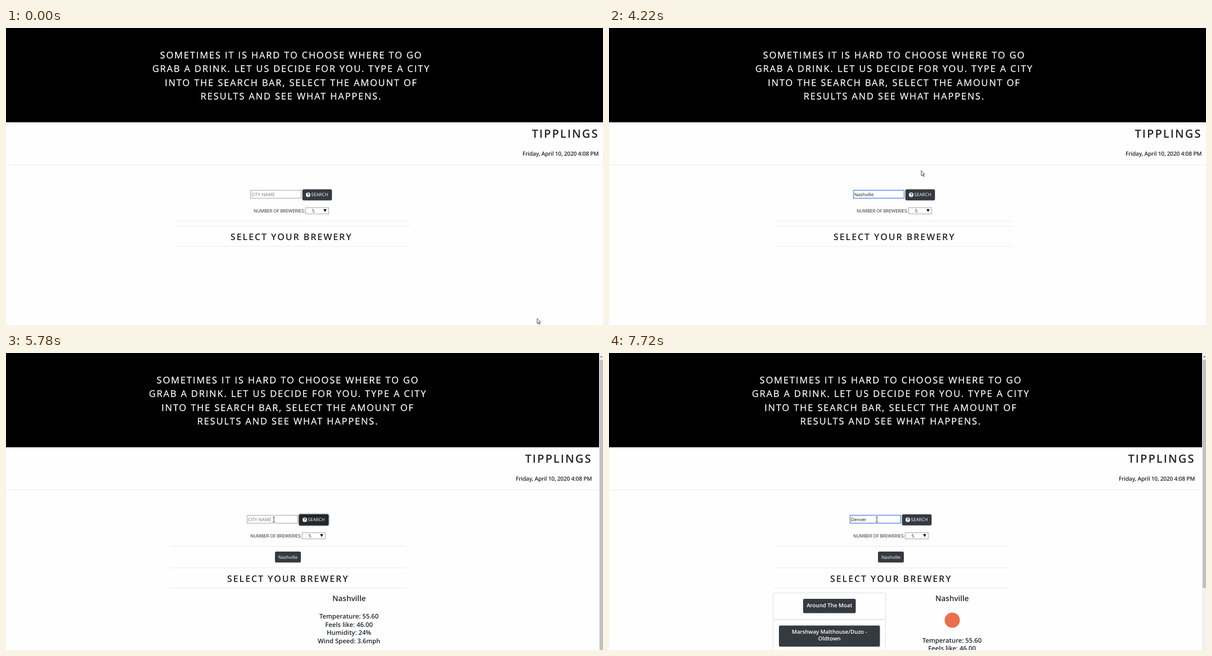
An HTML page for the animation above (8 s loop, 1061x528 px).

```html
<!DOCTYPE html>
<html lang="en">
<head>
<meta charset="utf-8">
<title>Brewery search</title>
<style>
  html, body { margin: 0; width: 100%; height: 100%; overflow: hidden; background: #fefefe; }
  svg { display: block; width: 1061px; height: 528px; }
  text { font-family: "Open Sans", "Noto Sans", sans-serif; font-size: 8.1px; fill: #212529; text-rendering: geometricPrecision; white-space: pre; }
  .mid { text-anchor: middle; }
  .end { text-anchor: end; }
  .intro text { font-size: 16.4px; letter-spacing: 1.88px; fill: #fff; stroke: #fff; stroke-width: .25; }
  .title { font-size: 20px; font-weight: 600; letter-spacing: 2.1px; }
  .date { font-size: 10.1px; font-weight: 600; letter-spacing: -.2px; }
  .head { font-size: 16px; font-weight: 600; letter-spacing: 1.92px; }
  .label { letter-spacing: -.13px; }
  .city { font-size: 13.4px; font-weight: 600; }
  .facts text { font-size: 11.3px; font-weight: 600; }
  .bar text { font-size: 9.7px; font-weight: 600; fill: #fff; }
  .light { fill: #fff; }
  .btn { fill: #343a40; }
  .rule { stroke: #ebebeb; }
  .card { fill: #fefefe; stroke: #dfdfdf; }
  .box { fill: #fff; stroke: #a9a9a9; }
  .focus { stroke: #4a86e0; stroke-width: 1.3; }
  .ring { stroke: #a8abae; stroke-width: 2.4; paint-order: stroke; fill: #23272b; }
</style>
</head>
<body>
<svg viewBox="0 0 1061 528">
  <rect width="1061" height="167.6"/>
  <path class="rule" d="M0 243.3H1061"/>

  <g id="right">
    <text class="title end" x="1053.5" y="194.5">TIPPLINGS</text>
    <text class="date end" x="1053.3" y="226.8">Friday, April 10, 2020 4:08 PM</text>
  </g>

  <g id="centre">
    <g class="intro mid">
      <text x="507" y="53.5">SOMETIMES IT IS HARD TO CHOOSE WHERE TO GO</text>
      <text x="507" y="78">GRAB A DRINK. LET US DECIDE FOR YOU. TYPE A CITY</text>
      <text x="507" y="102.5">INTO THE SEARCH BAR, SELECT THE AMOUNT OF</text>
      <text x="507" y="127">RESULTS AND SEE WHAT HAPPENS.</text>
    </g>

    <rect id="field" class="box" x="434.5" y="288.5" width="90" height="14"/>
    <text id="entry" x="436" y="298.5"></text>
    <rect id="caret" y="290" width="1" height="11"/>

    <rect id="search" class="btn" x="526.7" y="286.8" width="52.6" height="19.7" rx="2.5"/>
    <circle class="light" cx="537" cy="296.6" r="4"/>
    <path d="M535.6 295.6Q535.8 294.3 537.1 294.3Q538.5 294.4 538.4 295.6Q538.2 296.4 537.1 297.2M537 298.2V299.2" fill="none" stroke="#343a40" stroke-width="1.1"/>
    <text class="light" x="542.5" y="299.4">SEARCH</text>

    <text class="label" x="440" y="328">NUMBER OF BREWERIES:</text>
    <rect class="box" x="532.5" y="319.5" width="41" height="11"/>
    <text class="mid" x="546" y="328">5</text>
    <path d="M564.3 322H569.7L567 327.3Z"/>

    <path class="rule" d="M298 343.5H717"/>
    <g id="recent">
      <rect class="btn" x="484" y="353" width="46" height="19.5" rx="2.5"/>
      <text class="light mid" x="507" y="365.8">Nashville</text>
    </g>
    <g id="select">
      <path class="rule" d="M298 352.3H717M298 388.3H717"/>
      <text class="head mid" x="507.3" y="377">SELECT YOUR BREWERY</text>
    </g>
  </g>

  <g id="weather" class="mid">
    <text class="city" x="609.8" y="441">Nashville</text>
    <circle id="sun" cx="610" cy="475" r="13.5" fill="#ec6e4c"/>
    <g id="facts" class="facts">
      <text x="609.6" y="472">Temperature: 55.60</text>
      <text x="609.6" y="486.5">Feels like: 46.00</text>
      <text x="609.6" y="501">Humidity: 24%</text>
      <text x="609.6" y="515.5">Wind Speed: 3.6mph</text>
    </g>
  </g>

  <g id="list" class="bar mid">
    <rect class="card" x="291.5" y="426.5" width="200" height="47" rx="2.5"/>
    <rect class="btn" x="345" y="437" width="93.5" height="25.5" rx="2.5"/>
    <text x="391.8" y="451.6">Around The Moat</text>
    <rect class="card" x="291.5" y="474" width="200" height="60" rx="2.5"/>
    <rect class="btn" x="302" y="484.5" width="179.5" height="37.5" rx="2.5"/>
    <text x="391.8" y="498.8">Marshway Malthouse/Duzo -</text>
    <text x="391.8" y="510.8">Oldtown</text>
  </g>

  <g id="scroll">
    <rect x="1054" width="7" height="528" fill="#f1f1f1"/>
    <path d="M1055.8 7.5L1058 5L1060.2 7.5Z" fill="#606060"/>
    <rect id="thumb" x="1055" y="12" width="6" fill="#c1c1c1"/>
  </g>

  <g id="pointer">
    <path id="arrow" d="M.5 .5V9.6L2.6 7.7L4 10.9L5.4 10.3L4 7.2H6.7Z" fill="#fff" stroke="#222" stroke-width=".8"/>
    <path id="beam" d="M-2 -4.5H-.6L0 -4L.6 -4.5H2M0 -4V4M-2 4.5H-.6L0 4L.6 4.5H2" fill="none" stroke="#333" stroke-width=".9"/>
    <path id="hand" d="M2.5 7V1Q3.3 -.2 4.1 1V4.5L8 5.3Q8.7 5.6 8.6 6.5L7.8 11.5H3.6L.7 7.8Q.8 6.2 2.5 7Z" fill="#fff" stroke="#222" stroke-width=".8"/>
  </g>
</svg>
<script>
  const LOOP = 8000;
  const $ = id => document.getElementById(id);

  // time, shape, x, y
  const moves = [
    [0, 'arrow', 943.5, 516], [340, 'arrow', 503.5, 352], [720, 'arrow', 473.5, 309],
    [1110, 'beam', 468.5, 301], [1500, 'arrow', 360.5, 276], [1890, 'arrow', 253.5, 257],
    [4220, 'arrow', 554.5, 253], [4600, 'hand', 540, 287], [5390, 'beam', 498, 289],
    [5780, 'beam', 476, 296]
  ];

  // time, typed text, caret shown
  const typing = [
    [0, '', false], [1500, '', true], [2270, 'N', true], [2650, 'Nas', true],
    [3060, 'Nashv', true], [3440, 'Nashville', true], [4220, 'Nashville', false],
    [4600, 'Nashville', true], [5000, '', false], [6160, '', true], [6560, 'D', true],
    [6940, 'Denv', true], [7330, 'Denver', true], [7720, 'Denver', false]
  ];

  const at = (steps, t) => steps.findLast(step => step[0] <= t);
  const show = (id, on) => $(id).setAttribute('visibility', on ? 'visible' : 'hidden');
  const shift = (id, x, y) => $(id).setAttribute('transform', `translate(${x} ${y})`);

  function draw(now) {
    const t = now % LOOP;
    const found = t >= 5390, scrolls = t >= 5780, listed = t >= 6160, sunny = t >= 6560;
    const pressed = t >= 5000 && !listed;
    const focused = t >= 1500 && !pressed;

    const [, text, caret] = at(typing, t);
    const entry = $('entry');
    entry.textContent = text || 'CITY NAME';
    entry.style.fill = text ? '#111' : '#757575';
    $('caret').setAttribute('x', 436 + (text ? entry.getComputedTextLength() : 0));
    show('caret', caret);
    $('field').setAttribute('class', focused ? 'box focus' : 'box');
    $('search').setAttribute('class', pressed ? 'ring' : 'btn');

    shift('centre', scrolls ? -6 : 0, 0);
    shift('right', scrolls ? -12 : 0, 0);
    shift('select', 0, found ? 29.7 : 0);
    shift('facts', 0, sunny ? 42.5 : 0);
    show('recent', found);
    show('weather', scrolls);
    show('sun', sunny);
    show('list', listed);
    show('scroll', scrolls);
    $('thumb').setAttribute('height', listed ? 406 : 516);

    const [, shape, x, y] = at(moves, t);
    for (const id of ['arrow', 'beam', 'hand']) show(id, id === shape);
    shift('pointer', x, y);
    requestAnimationFrame(draw);
  }
  draw(performance.now());
</script>
</body>
</html>
```
